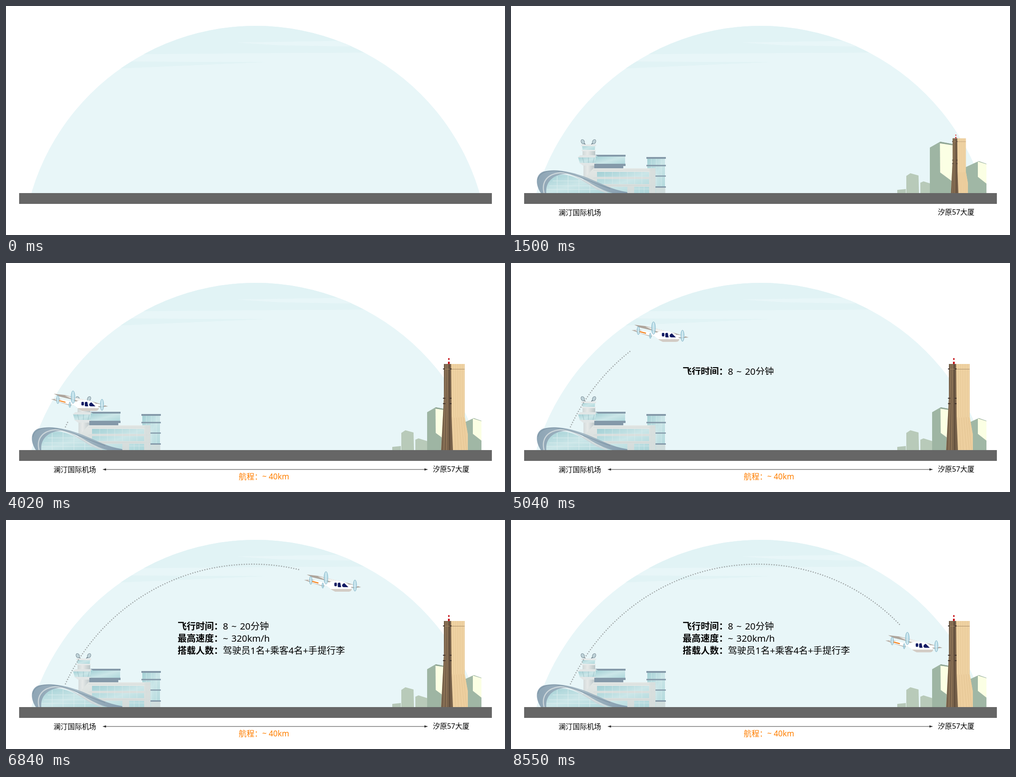
Animation, 1102 px wide and 508 px high, one loop 9.93 s. Source, as an HTML page:

```html
<!DOCTYPE html>
<html lang="zh">
<head>
<meta charset="utf-8">
<style>
  html, body { margin: 0; width: 100%; height: 100%; overflow: hidden; background: #fff; }
  svg { display: block; width: 100%; height: 100%; }
  text { font-family: "Noto Sans", "Noto Sans CJK SC", "Noto Sans CJK", sans-serif; }
  .label { font-size: 15.7px; text-anchor: middle; }
  .row { font-size: 20.3px; word-spacing: 2px; }
  .row .key { font-size: 20px; font-weight: 700; }
</style>
</head>
<body>
<svg viewBox="0 0 1102 508">
  <defs>
    <clipPath id="dome"><circle cx="551" cy="559.7" r="515.7"/></clipPath>
    <clipPath id="row0"><rect x="370" y="221" width="400" height="27"/></clipPath>
    <clipPath id="row1"><rect x="370" y="248" width="400" height="27"/></clipPath>
    <clipPath id="row2"><rect x="370" y="275" width="400" height="27"/></clipPath>
    <clipPath id="wipe"><rect id="wipeBox" y="450" height="16"/></clipPath>
    <linearGradient id="glass" x2="1" y2="1">
      <stop offset="0" stop-color="#a3d0d5"/><stop offset=".5" stop-color="#cbe6e8"/><stop offset="1" stop-color="#acd6da"/>
    </linearGradient>
    <linearGradient id="wall" x2="0" y2="1">
      <stop offset="0" stop-color="#e3e7e5"/><stop offset="1" stop-color="#d3dbda"/>
    </linearGradient>
    <linearGradient id="shaft">
      <stop offset="0" stop-color="#d0d8d8"/><stop offset=".4" stop-color="#e6e9e8"/><stop offset="1" stop-color="#bac5c7"/>
    </linearGradient>
    <linearGradient id="roof">
      <stop offset="0" stop-color="#8ea5b5"/><stop offset=".5" stop-color="#a5b9c5"/><stop offset="1" stop-color="#839cae"/>
    </linearGradient>
    <pattern id="tan" width="4" height="10" patternUnits="userSpaceOnUse">
      <path fill="#f0d4a5" d="M0 0h4v10H0z"/><path fill="#e4c492" d="M0 0h1v10H0z"/>
    </pattern>
  </defs>

  <g clip-path="url(#dome)">
    <path fill="#e8f6f8" d="M0 0H1102V416H0z"/>
    <path fill="#e1f3f5" d="M250 40H850V103L585 104.500 290 107z"/>
    <path fill="#e8f6f8" d="M510 81L760 77V90L600 87z"/>
    <path fill="#e1f3f5" d="M240 123L575 124.500 240 139z"/>
  </g>

  <g id="airport">
    <!-- control tower -->
    <g fill="#bfd3d9" stroke="#71838e">
      <path d="M158 302l7 6M183 301l-6 7" stroke-width="2"/>
      <ellipse cx="158.500" cy="301" rx="3.500" ry="5" transform="rotate(-25 158.500 301)"/>
      <ellipse cx="183.500" cy="301" rx="3.500" ry="5" transform="rotate(25 183.500 301)"/>
    </g>
    <path fill="url(#shaft)" d="M160 345H184V405H160zM158 320H186V334H158z"/>
    <path fill="url(#glass)" d="M157 309H186L185 320H158z"/>
    <path fill="#e6eaea" d="M155 307H188V311H155zM156 319H187V322H156z"/>
    <path fill="url(#glass)" d="M148 335H194L190 349H152z"/>
    <path fill="#e1e6e6" d="M153 331H189L195 336H147zM151 348H191L184 354H159z"/>
    <path stroke="#8fb0b8" stroke-width=".7" d="M158 336l3 12M171 336v12M184 336l-3 12"/>
    <!-- terminal blocks -->
    <path fill="url(#glass)" d="M187 333H252V352H187z"/>
    <path fill="#8499a9" d="M186 330H253V334H192zM184 350H253V355H248V360H184z"/>
    <path fill="url(#wall)" d="M182 360H320V415H160V385z"/>
    <path fill="url(#glass)" d="M190 368H305V379H190zM190 384H305V395H190zM220 401H257V415H220zM272 401H305V415H272z"/>
    <path stroke="#c6cfcf" stroke-width=".6" d="M182 364H320M182 381.500H320M182 398H320M311 360V415M316 360V415"/>
    <path stroke="#e2efef" stroke-width=".6" d="M207 368V395M224 368V395M240 368V395M257 368V395M273 368V395M289 368V395M283 401V415M294 401V415M272 406H305"/>
    <path fill="url(#glass)" d="M301 338H340V415H319V360H301z"/>
    <path fill="#d8dfde" d="M306 361H319V415H306zM320 402H341V415H320z" opacity=".8"/>
    <path stroke="#ddeeef" stroke-width=".7" d="M310 339V360M321 339V402M332 339V402"/>
    <path fill="#8499a9" d="M299 335H342V339H299zM299 352.500H342V355.500H299zM319 376H342V378.500H319zM319 400H342V403H319z"/>
    <!-- curved hall -->
    <path fill="url(#glass)" d="M74 415C73 384 98 371 124 375C158 382 177 405 224 415z"/>
    <path fill="none" stroke="#dcedee" d="M84 399H184M79 407H204M92 388H166M102 377V415M126 376V415M150 385V415M174 398V415"/>
    <path fill="url(#roof)" d="M66 415C52 394 55 373 72 367C101 360 135 368 169 381C202 395 225 408 257 413V415H224C190 407 165 383 137 374C104 367 75 384 78 415z"/>
    <path fill="none" stroke="#ccd6da" stroke-width="2.500" d="M73 415C67 390 80 373 108 370C140 369 163 391 188 405L213 415"/>
    <path fill="none" stroke="#758d9e" d="M59 386C62 371 77 364 101 366C140 370 180 393 219 405"/>
  </g>

  <g id="lowBlock" fill="#b6c8b8"><path d="M853 408L872 406V415H853z"/></g>
  <g id="midBlock" fill="#b8cab9"><path d="M873 377L882 371 900 376 901 415H873z"/></g>
  <g id="smallBlock" fill="#b8cab9"><path d="M904 392L911 389 930 395V415H904z"/></g>
  <g id="eastBlock">
    <path fill="#a0b7a5" d="M1003 358L1033 344 1050 350V415H1003z"/>
    <path fill="#fbffe4" d="M1031 345L1050 351V394L1031 379z"/>
  </g>
  <g id="westBlock">
    <path fill="#9eb5a3" d="M930 331L949 320 980 326V415H930z"/>
    <path fill="#fbffe4" d="M948.500 323L980 327V400L949 377z"/>
    <path fill="#91a796" d="M949 320L980 326V328L948 323z"/>
  </g>
  <g id="skyscraper">
    <path fill="url(#tan)" d="M967 224H1013V341L1020 381V415H961L967 300z"/>
    <path fill="#edcf9f" d="M985 342H1013L1020 381V415H987z"/>
    <path stroke="#dfbf8d" stroke-width=".7" d="M990 344l3 71M995 343l4 72M1000 343l6 72M1005 342l7 73M1010 342l7 73"/>
    <path fill="#77614a" d="M967 224H983L984 340 987 415H961L967 300z"/>
    <path stroke="#a88a66" d="M971.500 225L967 415M975 225L973 415"/>
    <path stroke="#4b3c31" stroke-width="1.200" d="M979 225L980 415"/>
    <path stroke="#a88b67" d="M966 235.500H1013"/>
    <path stroke="#40332c" stroke-width="2" d="M965 235h4M980 235h4M965 300h5M980 300h4M965 312h5M980 312h4"/>
    <path fill="#fff" d="M976.500 208H979.500V224H976z"/>
    <path fill="#c8161d" d="M976.500 211h3v4h-3zM976 219h4v5h-4z"/>
  </g>

  <path fill="#666" d="M29 415H1073V439H29z"/>
  <text class="label" id="fromLabel" x="152" y="463.500">澜汀国际机场</text>
  <text class="label" id="toLabel" x="983" y="462.500">汐原57大厦</text>

  <g clip-path="url(#wipe)">
    <path stroke="#777" stroke-width="1.300" d="M218 458H927"/>
    <path fill="#333" d="M213 458l8-2.500v5zM932 458l-8-2.500v5z"/>
  </g>
  <text id="range" x="514" y="479.500" font-size="17.300" fill="#ff7f00">航程：~ 40km</text>

  <g clip-path="url(#row0)"><text class="row" y="242.500"><tspan class="key" x="379">飞行时间：</tspan><tspan x="479">8 ~ 20分钟</tspan></text></g>
  <g clip-path="url(#row1)"><text class="row" y="269.500"><tspan class="key" x="379">最高速度：</tspan><tspan x="479">~ 320km/h</tspan></text></g>
  <g clip-path="url(#row2)"><text class="row" y="296.500"><tspan class="key" x="379">搭载人数：</tspan><tspan x="479">驾驶员1名+乘客4名+手提行李</tspan></text></g>

  <polyline id="trail" fill="none" stroke="#a1a8a9" stroke-width="2.800" stroke-linecap="round" stroke-dasharray="0 5.500"/>

  <g id="plane">
    <!-- tail -->
    <path fill="#b9b0a7" d="M-64-3L-46-4-34 0-17 5-20 12-45 4z"/>
    <path fill="#fff" d="M-56-3L-40-2-14 4-14 9-24 9-46 3z"/>
    <path stroke="#f07d14" stroke-width="2.200" d="M-47 0L-32 4"/>
    <!-- main wing and body -->
    <path fill="#aea59c" d="M-58-15L-33-12-5-5 30 3 62 13 45 15 10 8-10 2-17-2-46-9z"/>
    <path fill="#f4f2ef" d="M-34-11L-10-6 14-1 0 2-14-2z"/>
    <path fill="#fff" d="M36 7L52 9 55 11 48 13 34 12z"/>
    <path fill="#fff" d="M-18 7C-8 1 0-1 11-1C27 0 37 6 41 15C42 20 38 22 33 22H4C-3 19-8 14-18 7z"/>
    <path fill="#d3ccc5" d="M-8 15L41 16C42 20 39 23 34 23H5C0 21-4 18-8 15z"/>
    <path fill="#fff" d="M-8 14L41 14 40 17-6 17z"/>
    <g fill="#121b63">
      <rect x="3" y="3" width="5.500" height="8" rx="1.800"/>
      <path d="M10.500 5Q11 3 13 3H16L18 13H12Q10 12 10.500 9z"/>
      <path d="M20 10Q20 6 25 4L34 13H24Q21 13 20 10z"/>
    </g>
    <g fill="#a9d5e4" fill-opacity=".75" stroke="#7fb0c3" stroke-width=".9">
      <ellipse cx="-15.500" cy="-7.500" rx="4.300" ry="14"/>
      <ellipse cx="48.500" cy="9.500" rx="3.700" ry="12.500"/>
      <ellipse cx="-49" cy="-2" rx="2.800" ry="9"/>
      <ellipse cx="-22.500" cy="9.500" rx="1.900" ry="6"/>
    </g>
    <path stroke="#e9f3f6" stroke-width="1.200" d="M-15.500-20V5M48.500-1V20M-49-9V5"/>
  </g>
</svg>

<script>
const LOOP = 9930;
const $ = id => document.getElementById(id);
const clamp = v => Math.min(1, Math.max(0, v));
const progress = (t, start, length) => clamp((t - start) / length);

// id, start time, x of the base point
const pops = [
  ["airport", 60, 199], ["lowBlock", 960, 863], ["midBlock", 960, 887], ["smallBlock", 960, 917],
  ["eastBlock", 960, 1020], ["westBlock", 1220, 955], ["skyscraper", 1425, 990]
];
const fades = [["fromLabel", 60], ["toLabel", 960], ["range", 1980]];
const rows = [...document.querySelectorAll(".row")];

// time, degrees from the top of the arc
const flight = [[3000, -69.1], [4020, -57], [5040, -28.2], [6030, 2], [7050, 29.2], [8070, 49.4], [8550, 53]];
const lag = [[3000, 6], [4020, 6.6], [5040, 9.7], [6840, 10.4], [8550, 6.1]];

// Grows past full size by a fifth, then settles.
function popScale(t, start) {
  const p = progress(t, start, 540) - 1;
  return Math.max(0, 1 + 3.6 * p ** 3 + 2.6 * p ** 2);
}

// Cubic Hermite curve through the keys, at rest at both ends.
function follow(keys, t) {
  const last = keys.length - 1;
  if (t <= keys[0][0]) return keys[0][1];
  if (t >= keys[last][0]) return keys[last][1];
  const i = keys.findIndex(k => k[0] > t) - 1;
  const slope = n => n <= 0 || n >= last ? 0 : (keys[n + 1][1] - keys[n - 1][1]) / (keys[n + 1][0] - keys[n - 1][0]);
  const [t0, a] = keys[i], [t1, b] = keys[i + 1];
  const d = t1 - t0, u = (t - t0) / d;
  const ease = u * u * (3 - 2 * u);
  return a + (b - a) * ease + d * u * (1 - u) * ((1 - u) * slope(i) - u * slope(i + 1));
}

function arcPoint(degrees) {
  const a = degrees * Math.PI / 180, r = a < 0 ? 455 : 433;
  return [545 + r * Math.sin(a), 98 + r * (1 - Math.cos(a))];
}

function drawTrail(end) {
  const points = [];
  for (let a = -65.4; a < end; a++) points.push(arcPoint(a));
  if (points.length) points.push(arcPoint(end));
  $("trail").setAttribute("points", points.join(" "));
}

function render(t) {
  for (const [id, start, x] of pops)
    $(id).setAttribute("transform", `translate(${x} 415) scale(${popScale(t, start)}) translate(${-x} -415)`);
  for (const [id, start] of fades) $(id).setAttribute("opacity", progress(t, start, 300));

  const half = 360 * progress(t, 1895, 680);
  $("wipeBox").setAttribute("x", 572.5 - half);
  $("wipeBox").setAttribute("width", 2 * half);

  rows.forEach((row, i) => {
    const hidden = 1 - progress(t, 4650 + 780 * i, 500);
    row.setAttribute("transform", `translate(0 ${27 * hidden})`);
    row.setAttribute("visibility", hidden < 1 ? "visible" : "hidden");
  });

  const angle = follow(flight, t);
  drawTrail(angle - follow(lag, t));
  $("plane").setAttribute("transform", `translate(${arcPoint(angle)}) scale(${popScale(t, 2710)})`);
}

function frame() {
  render(performance.now() % LOOP);
  requestAnimationFrame(frame);
}
frame();
</script>
</body>
</html>
```
